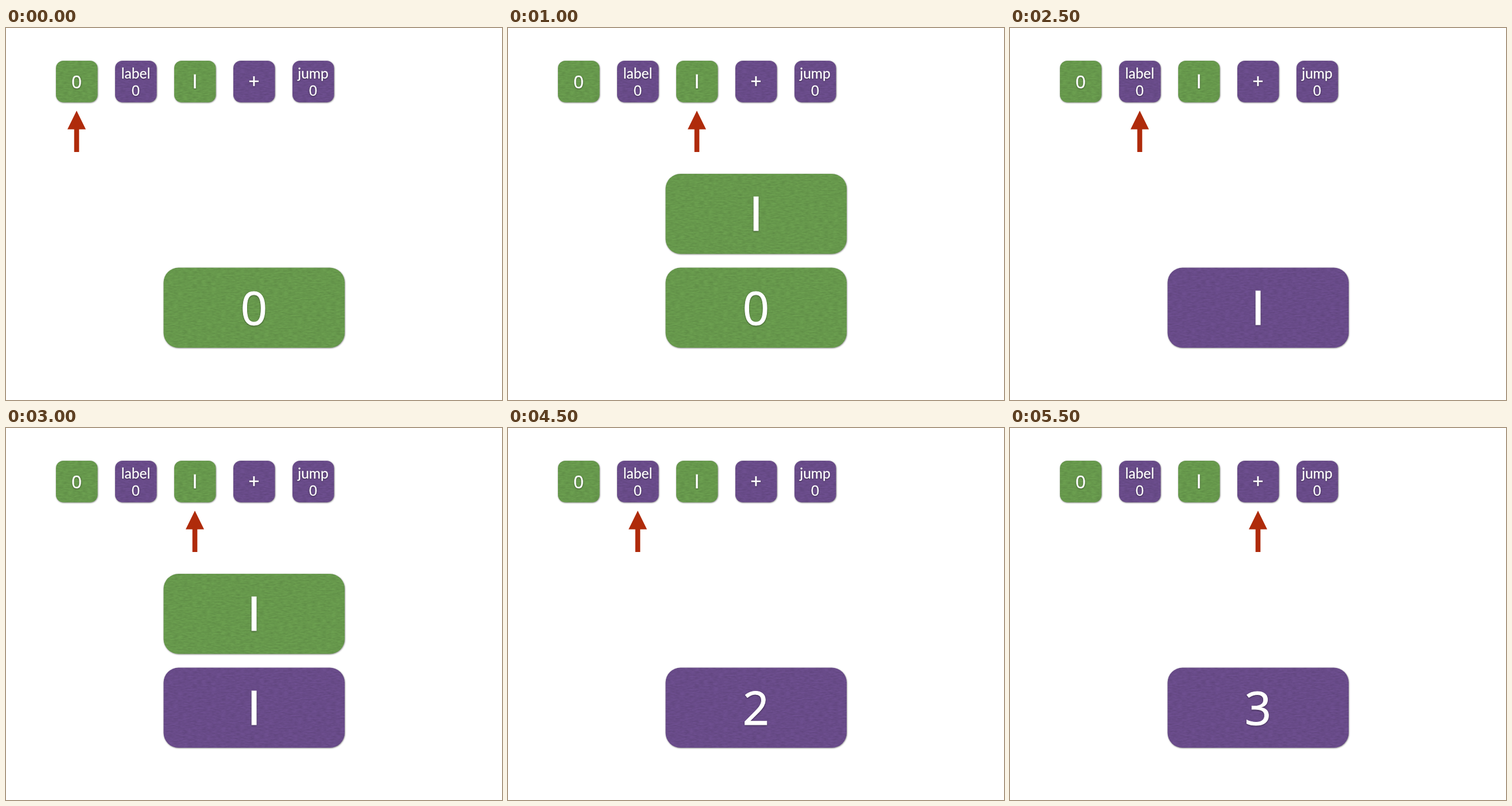
Write an HTML page that moves like this. It is 864 by 648 pixels and loops after 6000 ms.

```html
<!DOCTYPE html>
<html lang="en">
<head>
<meta charset="utf-8">
<title>Stack machine loop</title>
<style>
  html, body { margin: 0; width: 100%; height: 100%; overflow: hidden; background: #fff; }
  svg { display: block; width: 100vw; height: 100vh; }
  text {
    font-family: "Open Sans", "Noto Sans", sans-serif;
    text-anchor: middle;
    fill: #fff;
    stroke: #fff;
    filter: drop-shadow(0 1px 1px rgba(0, 0, 0, .45));
  }
  .word { font-family: Lato, sans-serif; }
</style>
</head>
<body>
<svg viewBox="0 0 864 648">
  <defs>
    <!-- faint paper grain plus a soft shadow -->
    <filter id="paper" x="-10%" y="-10%" width="120%" height="120%" color-interpolation-filters="sRGB">
      <feTurbulence type="fractalNoise" baseFrequency=".12 .4" numOctaves="3" seed="4"/>
      <feColorMatrix values="0 0 0 0 0  0 0 0 0 0  0 0 0 0 0  .2 0 0 0 -.05"/>
      <feComposite in2="SourceGraphic" operator="atop"/>
      <feDropShadow dx=".5" dy=".8" stdDeviation="1.2" flood-color="#000" flood-opacity=".5"/>
    </filter>
  </defs>
  <g id="tiles"></g>
  <path id="arrow" fill="#af2b0b" d="M0 144L16 176.5H4.3V216H-4.3V176.5H-16Z"/>
  <g id="stack"></g>
</svg>
<script>
const GREEN = "#6ca050", PURPLE = "#6e4f90";
const STEP = 500, STEPS = 12;
const tiles = document.getElementById("tiles");
const stack = document.getElementById("stack");
const arrow = document.getElementById("arrow");

const tileX = i => 123 + 103 * i;

function add(parent, tag, attrs, content = "") {
  const el = document.createElementNS("http://www.w3.org/2000/svg", tag);
  for (const key in attrs) el.setAttribute(key, attrs[key]);
  el.textContent = content;
  return parent.appendChild(el);
}

function box(parent, x, y, width, height, rx, fill) {
  return add(parent, "rect", { x, y, width, height, rx, fill, filter: "url(#paper)" });
}

function label(parent, content, x, y, size, word = false) {
  return add(parent, "text", {
    x, y, "font-size": size, "stroke-width": size / 80, class: word ? "word" : ""
  }, content);
}

// The one is a plain upright bar.
function digit(parent, n, x, y, size) {
  return n === 1 ? label(parent, "I", x, y, size, true) : label(parent, n, x, y, size);
}

function tile(i, fill) {
  box(tiles, tileX(i) - 36, 57, 72.5, 72.5, 13, fill);
}

function wordTile(i, word) {
  tile(i, PURPLE);
  label(tiles, word, tileX(i), 87.5, 24.5, true);
  digit(tiles, 0, tileX(i), 117.5, 26);
}

function card(n, y, fill) {
  box(stack, 274.5, y, 315.5, 139.5, 26, fill);
  digit(stack, n, 432, y + 99, 81);
}

tile(0, GREEN);
digit(tiles, 0, tileX(0), 105, 31.5);
wordTile(1, "label");
tile(2, GREEN);
digit(tiles, 1, tileX(2), 105, 32);
tile(3, PURPLE);
label(tiles, "+", tileX(3), 105, 34);
wordTile(4, "jump");

let shown = -1;

function frame(now) {
  const step = Math.floor(now / STEP) % STEPS;
  if (step !== shown) {
    shown = step;
    const at = step ? (step - 1) % 4 + 1 : 0;
    const sum = Math.floor((step + 1) / 4);
    arrow.setAttribute("transform", `translate(${tileX(at)} 0)`);
    stack.replaceChildren();
    card(sum, 417.5, sum ? PURPLE : GREEN);
    if (at === 2) card(1, 254, GREEN);
  }
  requestAnimationFrame(frame);
}

frame(performance.now());
</script>
</body>
</html>
```
